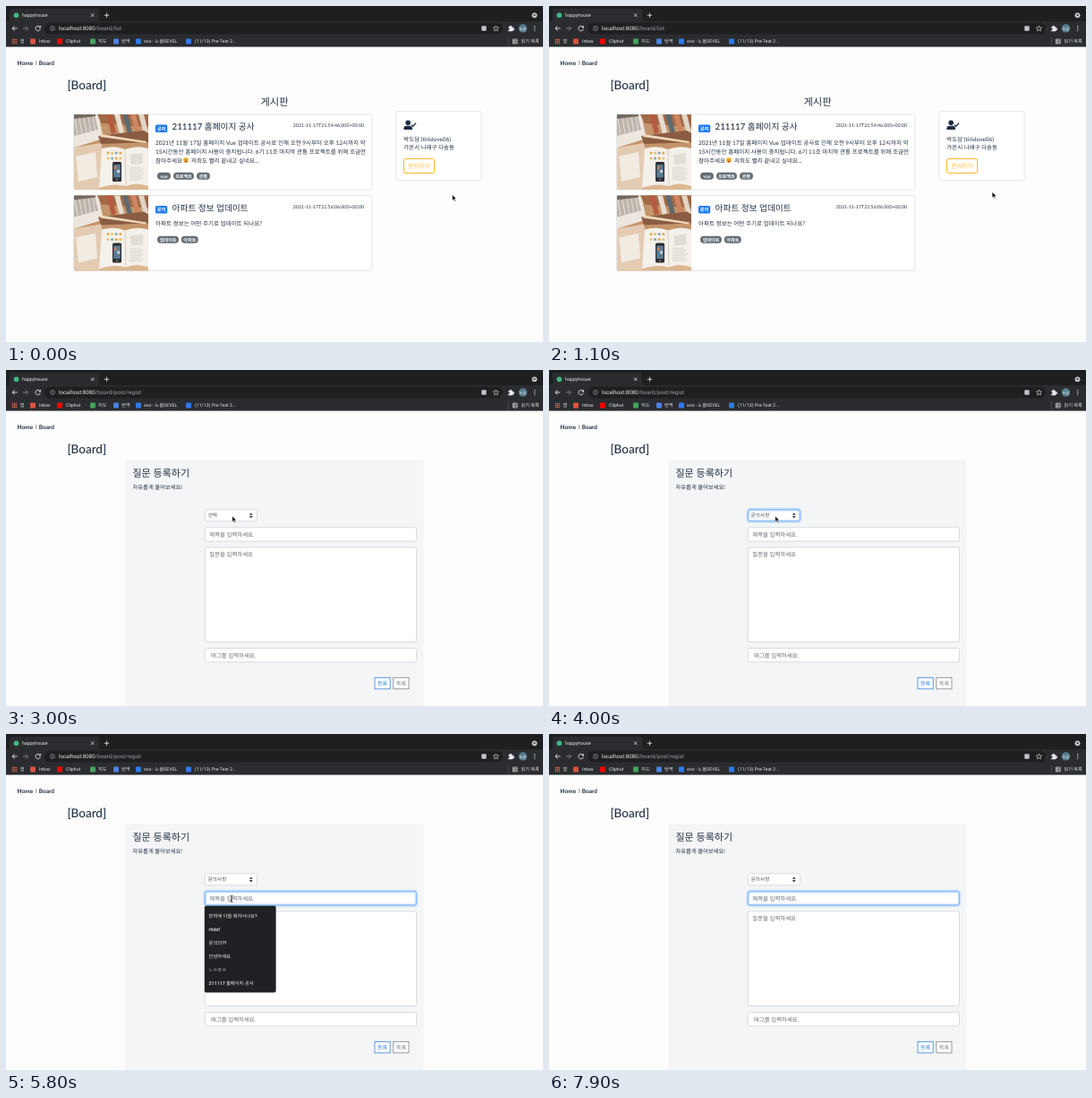
Write an HTML page that moves like this. It is 600 by 375 pixels and loops after 8000 ms.

```html
<!DOCTYPE html>
<html lang="ko">
<head>
<meta charset="utf-8">
<title>happyhouse</title>
<style>
html, body { margin: 0; width: 100%; height: 100%; overflow: hidden; background: #fdfdfd; }
svg { display: block; width: 600px; height: 375px; }
text { font-family: Lato, "Noto Sans CJK KR", "Noto Sans CJK", sans-serif; white-space: pre; text-rendering: geometricPrecision; }
.ui text { font-family: Roboto, "Noto Sans CJK KR", "Noto Sans CJK", sans-serif; }
</style>
</head>
<body>
<svg id="stage" viewBox="0 0 600 375" xmlns="http://www.w3.org/2000/svg"></svg>
<script>
const LOOP = 8000, INK = '#213143', MUTED = '#646c74', LIGHT = '#e8eaed', AMBER = '#fdb827';
const STRIP = '#1e1f21', BAR = '#2b2c2f';

const text = (x, y, size, str, fill = INK, extra = '') =>
  `<text x="${x}" y="${y}" font-size="${size}" fill="${fill}" ${extra}>${str}</text>`;
const rect = (x, y, w, h, fill, extra = '') =>
  `<rect x="${x}" y="${y}" width="${w}" height="${h}" fill="${fill}" ${extra}/>`;
const circle = (x, y, r, fill, extra = '') =>
  `<circle cx="${x}" cy="${y}" r="${r}" fill="${fill}" ${extra}/>`;
const path = (d, fill, extra = '') => `<path d="${d}" fill="${fill}" ${extra}/>`;
const line = (d, color, width = .9) => path(d, 'none', `stroke="${color}" stroke-width="${width}"`);
const group = (id, body, extra = '') => `<g id="${id}" ${extra}>${body}</g>`;
const box = (x, y, w, h, stroke = '#ced4da', fill = '#fff') =>
  rect(x, y, w, h, fill, `rx="1.8" stroke="${stroke}" stroke-width=".8"`);
const bold = 'font-weight="700"', medium = 'font-weight="500"', middle = 'text-anchor="middle"';

function browser() {
  const marks = [
    [27, '#e25041', 37, 'Inbox'], [57, '#ff0000', 67, 'Cliphut'], [94, '#43a35c', 103, '지도'],
    [120, '#4c82e8', 129, '번역'], [145, '#2f7bea', 154, 'ovo - 노을DEVEL'],
    [201, '#2f7bea', 211, '(11/13) Pre-Test 2...']
  ];
  let s = rect(0, 0, 600, 18, STRIP) + rect(0, 17, 600, 28.6, BAR)
    + path('M1 17.5Q4 17.5 4 14V6Q4 3 7 3H101Q104 3 104 6V14Q104 17.5 107 17.5Z', BAR)
    + circle(11.5, 10.3, 2.9, '#41b883')
    + text(18, 12.2, 5.3, 'happyhouse', LIGHT)
    + line('M95 8.6l3.4 3.4m0-3.4l-3.4 3.4M109.8 10.3h5.4m-2.7-2.7v5.4', LIGHT, .8)
    + circle(590.5, 10.3, 2.9, '#c8cacd') + path('M589 9.5h3l-1.5 2z', STRIP);
  s += line('M12.5 25H7m2.6-2.6L7 25l2.6 2.6', LIGHT)
    + line('M19 25h5.5m-2.6-2.6l2.6 2.6-2.6 2.6', '#85878a')
    + line('M38 23.6a2.7 2.7 0 1 0 .3 2.2', LIGHT) + path('M38.9 21.8v2.7h-2.7z', LIGHT)
    + rect(43, 18.7, 512, 12.8, STRIP, 'rx="6.4"')
    + circle(52, 25, 2.4, 'none', 'stroke="#9aa0a6" stroke-width=".7"')
    + line('M52 24.6v1.8m0-3.2v.7', '#9aa0a6', .7)
    + text(59, 27.2, 6.2, 'localhost:8080<tspan id="route" fill="#9aa0a6"></tspan>', LIGHT)
    + rect(531.3, 22.3, 5.4, 5.4, '#bfc2c6', 'rx=".7"')
    + path('M547.5 22l.9 2 2.2.2-1.7 1.5.5 2.2-1.9-1.2-1.9 1.2.5-2.2-1.7-1.5 2.2-.2z', 'none',
      'stroke="#d5d7da" stroke-width=".7"')
    + path('M561.2 23.2h1.6a1.1 1.1 0 1 1 2 0h1.6v1.6a1.1 1.1 0 1 1 0 2v1.4h-5.2v-1.6a1 1 0 1 0 0-1.8z', LIGHT)
    + circle(577.5, 25, 4.7, '#557c8c') + text(577.5, 26.6, 4, '도담', '#fff', middle)
    + [22.7, 25, 27.3].map(y => circle(590.8, y, .65, LIGHT)).join('');
  for (let i = 0; i < 9; i++)
    s += rect(6.8 + i % 3 * 2, 36.8 + (i / 3 | 0) * 2, 1.4, 1.4, ['#e35d50', '#d7843c', '#e35d50'][i % 3]);
  s += text(15.5, 41.2, 5.2, '앱', LIGHT);
  for (const [x, color, tx, label] of marks)
    s += rect(x, 36.5, 6, 6, color, 'rx="1"') + text(tx, 41.2, 5.2, label, LIGHT);
  return s + line('M561.5 35.5v8', '#5f6368', .6)
    + path('M566.3 37h5v5h-5zm0 1.7h5m-5 1.7h5m-3.3-3.4v5', 'none', `stroke="${LIGHT}" stroke-width=".6"`)
    + text(575.5, 41.2, 5.2, '읽기 목록', LIGHT);
}

// Desk picture in a box of 83 by 84
function photo() {
  let s = rect(0, 0, 83, 84, '#dcb791') + rect(0, 0, 83, 40, '#c4946a')
    + path('M0 0H27L33 27 0 37Z', '#ece6de') + path('M0 5L23 1 27 17 0 24Z', '#bdb5ac')
    + path('M0 0H24L24 2 0 5Z', '#756a63') + path('M26 0H83V14L31 10Z', '#a06a48');
  for (let i = 0; i < 5; i++) {
    s += line(`M${1 + i * 5} ${5 - i * .5}l3 17`, '#f1ede7', .8);
    s += path(`M${36 + i * 9} 0h6l5 20-5 2z`, ['#b65a40', '#e8ddcf', '#5f6a6e', '#cf8660', '#e3d5c4'][i]);
  }
  s += path('M27 24L78 18 83 21V31L30 33Z', '#8a5c42') + path('M30 22L81 30 80 32 29 25Z', '#edd9b8')
    + path('M0 37L30 32 35 57 28 84H0Z', '#e3cbb2') + path('M2 47L24 42 26 70 5 75Z', '#f2ebe2')
    + path('M31 38Q46 34 57 39 70 34 83 38V80Q69 75 58 80 44 76 28 82Z', '#f4f0ea')
    + line('M57 39l1 40', '#d2c8bb', .8) + path('M63 45l14-2v12l-13 1z', '#e2dcd3');
  for (let i = 0; i < 8; i++) {
    s += circle(38 + i % 4 * 4.6, 43 + (i / 4 | 0) * 6, 1.5, ['#e5a848', '#e9c06c', '#84a5b8'][i % 3]);
    s += line(`M62 ${59 + i * 2}h${13 + i * 3 % 5}`, '#cbc4ba', .6);
  }
  return s + rect(43, 53, 10, 22, '#2a2c30', 'rx="1.5"') + rect(44.2, 56, 7.6, 14.5, '#5b7c95')
    + rect(45, 58, 2.5, 3, '#d97945') + rect(48.3, 62, 2.5, 3, '#d7e0e6') + circle(48, 72.7, 1, '#888');
}

function post(y, badge, title, stamp, lines, tags) {
  const tagY = y + 16 + lines.length * 10 + (lines.length > 1 ? 18.7 : 19.3);
  let s = rect(75.5, y, 333.3, 84, '#fff', 'rx="1.8" stroke="#dcdfe1" stroke-width=".8"')
    + `<use href="#photo" x="76" y="${y}"/>`
    + rect(167, y + 11.4, 13.2, 8.6, '#1877f2', 'rx="1.5"')
    + text(173.6, y + 17.7, 5.4, badge, '#fff', `${middle} ${bold}`)
    + text(185.6, y + 17.2, 9.7, title, INK, medium)
    + text(400, y + 14, 5.25, stamp, INK, 'text-anchor="end"');
  lines.forEach((l, i) => s += text(167, y + 33.5 + i * 10, 6.52, l));
  for (const [x, w, label] of tags)
    s += rect(x, tagY, w, 8, MUTED, 'rx="4"')
      + text(x + w / 2, tagY + 5.8, 5.1, label, '#fff', `${middle} ${bold}`);
  return s;
}

function listView() {
  return text(300, 110.7, 11.3, '게시판', INK, `${middle} ${medium}`)
    + post(121, '공지', '211117 홈페이지 공사', '2021-11-17T21:54:46.000+00:00', [
      '2021년 11월 17일 홈페이지 Vue 업데이트 공사로 인해 오전 9시부터 오후 12시까지 약',
      '15시간동안 홈페이지 사용이 중지됩니다. 6기 11조 마지막 관통 프로젝트를 위해 조금만',
      '참아주세요<tspan x="207">저희도 빨리 끝내고 싶네요...</tspan>'
    ], [[169, 15, 'vue'], [187, 23, '프로젝트'], [213, 15, '관통']])
    + circle(201, 172.1, 3, '#f9c23c')
    + line('M199.4 170.8l1 .6-1 .5m3.2-1.1l-1 .6 1 .5', '#6b4a1d', .5)
    + path('M199.3 172.7h3.4a1.7 1.7 0 0 1-3.4 0z', '#b6432f')
    + post(211.5, '문의', '아파트 정보 업데이트', '2021-11-17T21:56:06.000+00:00',
      ['아파트 정보는 어떤 주기로 업데이트 되나요?'], [[169, 24, '업데이트'], [195.8, 19, '아파트']])
    + rect(435.8, 117.6, 95.3, 77.2, '#fff', 'rx="1.8" stroke="#dcdfe1" stroke-width=".8"')
    + circle(449.2, 130.3, 2.8, '#1d2b44')
    + path('M444.4 138v-1.4q0-2.9 3-2.9h3.6q3 0 3 2.9v1.4z', '#1d2b44')
    + line('M453 132.6l1.7 1.7 3.4-3.7', '#1d2b44', 1.3)
    + text(444.3, 150.7, 6.45, '박도담 (tirislove06)')
    + text(444.3, 160.4, 6.45, '가온시 나래구 다솜동')
    + `<rect id="ask" x="444.5" y="170.5" width="34" height="16" rx="1.8" stroke="${AMBER}"/>`
    + text(461.5, 180.8, 6.5, '문의하기', AMBER, `${middle} id="askText"`);
}

function formView() {
  const ring = (id, x, y, w, h) => rect(x, y, w, h, 'none',
    `id="${id}" rx="2" stroke="#80bdff" stroke-width="1" style="filter:drop-shadow(0 0 1px #4799ff)"`);
  const button = (x, label, color) =>
    rect(x, 343.3, 17.2, 12.6, '#fdfdfd', `stroke="${color}" stroke-width=".8"`)
    + text(x + 8.6, 351.9, 6.1, label, color, middle);
  const hints = ['방학에 다들 뭐하시나요?', 'rhdsf', '문의의??', '안녕하세요', 'ㄴㅇㄹㅇ', '211117 홈페이지 공사'];
  return rect(133.3, 100.3, 333.2, 275, '#f4f5f7')
    + text(141.5, 119, 11, '질문 등록하기', INK, medium)
    + text(141.5, 132.7, 6.3, '자유롭게 물어보세요!')
    + box(222.3, 155.8, 58.2, 13) + ring('selectRing', 222.3, 155.8, 58.2, 13)
    + text(225.7, 164.4, 5.6, '', '#495057', 'id="choice"')
    + path('M271.8 161.8l2-2.4 2 2.4zm0 1.2l2 2.4 2-2.4z', '#343a40')
    + box(222.3, 175.7, 236.2, 15.4) + ring('titleRing', 222.3, 175.7, 236.2, 15.4)
    + text(227.3, 185.7, 6.4, '제목을 입력하세요.', MUTED)
    + box(222.3, 197.9, 236.2, 105.6) + text(227.3, 207.9, 6.4, '질문을 입력하세요', MUTED)
    + box(222.3, 310.5, 236.2, 15.4) + text(229, 320.5, 6.4, '태그를 입력하세요.', MUTED)
    + button(412, '등록', '#3584dc') + button(432.8, '목록', '#7b838a')
    + group('hints', rect(221.8, 191.7, 79.8, 96.8, '#202124', 'rx="1.8"')
      + hints.map((h, i) => text(226.6, 204.5 + i * 15, 5.3, h, '#f5f5f5', medium)).join(''), 'class="ui"');
}

function cursors() {
  const edge = 'stroke="#fff" stroke-width=".6" stroke-linejoin="round"';
  return group('arrow', path('M0 0V6.6L1.6 5.2 2.7 7.6 3.9 7.1 2.8 4.8H4.8Z', '#000', edge))
    + group('hand', path('M-.7 0Q0-.8.7 0V2.8Q1.5 2.2 2 3 2.8 2.5 3.2 3.3 4.2 3 4.2 4.2L3.5 7H-.3L-2.6 3.9Q-2.4 2.8-.7 4.2Z',
      '#fff', 'stroke="#000" stroke-width=".6"'))
    + group('beam', line('M-1.6-3.6Q0-3.6 0-2.6 0-3.6 1.6-3.6M0-2.6V2.6M-1.6 3.6Q0 3.6 0 2.6 0 3.6 1.6 3.6M-.9.9h1.8', '#222', .8));
}

document.getElementById('stage').innerHTML =
  `<defs>${group('photo', photo())}</defs>` + rect(0, 0, 600, 375, '#fdfdfd')
  + group('browser', browser(), 'class="ui"')
  + text(12.6, 65.7, 6.5, 'Home', INK, bold) + line('M33.8 61v5', INK, .5) + text(36.7, 65.7, 6.5, 'Board', INK, bold)
  + text(68.4, 93.2, 13.5, '[Board]', INK, medium)
  + group('list', listView()) + group('form', formView()) + group('cursor', cursors());

const $ = id => document.getElementById(id);
const show = (id, on) => $(id).style.display = on ? '' : 'none';
const track = [[0, 498.5, 210.5], [1000, 498.5, 210.5], [1500, 466.3, 182], [1900, 466.3, 182],
  [2700, 252.7, 163], [4100, 252.7, 163], [4600, 252, 184], [LOOP, 252, 184]];

function pointer(t) {
  const i = track.findIndex(k => k[0] > t);
  const [t0, x0, y0] = track[i - 1], [t1, x1, y1] = track[i];
  const p = (t - t0) / (t1 - t0), e = p * p * (3 - 2 * p);
  return [x0 + (x1 - x0) * e, y0 + (y1 - y0) * e];
}

function draw(t) {
  const onForm = t >= 1800, [x, y] = pointer(t);
  const hover = !onForm && x < 478.5 && y < 186.5;
  const overField = onForm && x > 222 && x < 458.5 && y > 175.7;
  show('list', !onForm);
  show('form', onForm);
  $('route').textContent = onForm ? '/board/post/regist' : '/board/list';
  $('ask').setAttribute('fill', hover ? AMBER : '#fff');
  $('askText').setAttribute('fill', hover ? '#212529' : AMBER);
  $('choice').textContent = t < 3900 ? '선택' : '문의사항';
  show('selectRing', t >= 3300 && t < 5500);
  show('titleRing', t >= 5500);
  show('hints', t >= 5600 && t < 6800);
  show('cursor', t < 6800);
  $('cursor').setAttribute('transform', `translate(${x} ${y})`);
  show('hand', hover);
  show('beam', overField);
  show('arrow', !hover && !overField);
}

const start = performance.now();
(function tick() {
  draw((performance.now() - start) % LOOP);
  requestAnimationFrame(tick);
})();
</script>
</body>
</html>
```
